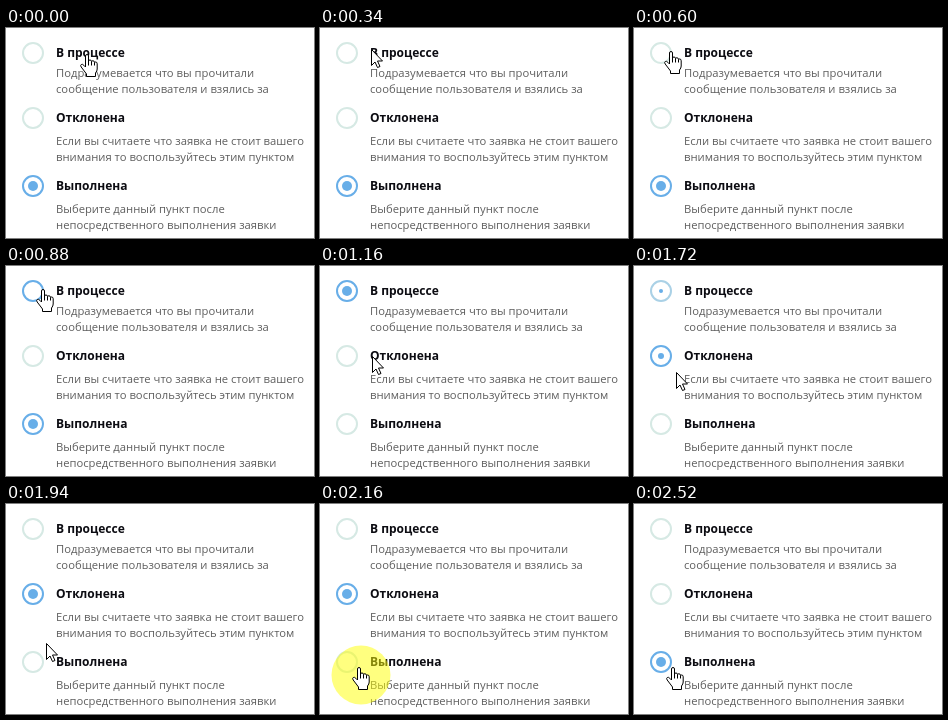
An HTML page that plays this animation: 308x210 px, repeating every 2.76 s.

```html
<!DOCTYPE html>
<html lang="ru">
<head>
<meta charset="utf-8">
<title>Статус заявки</title>
<style>
html, body { margin: 0; width: 100%; height: 100%; overflow: hidden; background: #fff; }
svg { display: block; width: 308px; height: 210px; }
text { font: 11.25px "Open Sans", sans-serif; fill: #5e5e5e; white-space: pre; }
.title { font-size: 12px; font-weight: 700; fill: #0c0c12; }
.ring { fill: none; stroke-width: 2; }
.dot { fill: #68aee8; }
.press { fill: #ff0; opacity: .5; }
.cursor path { fill: #fff; stroke: #000; stroke-linejoin: round; }
.cursor .line { fill: none; }
</style>
</head>
<body>
<svg viewBox="0 0 308 210">
  <g id="options"></g>
  <circle id="press" class="press" r="29.5"/>
  <g id="hand" class="cursor">
    <path d="M-1.5 13V2Q-1.5 .5 0 .5T1.5 2V7Q1.5 6 3 6T4.5 7.5Q4.5 6.8 6 6.8T7.5 8.5Q7.5 8 8.8 8T10.2 9.8V15Q10.2 17 8.5 19V22.5H-.5V20L-5.8 13Q-7 11.2 -5.7 10.5T-3.2 11.3Z"/>
    <path class="line" d="M1.5 6.5V11.5M4.5 7.5V11.5M7.5 8.5V11.5"/>
  </g>
  <g id="arrow" class="cursor">
    <path d="M.5 .5V16.5L4 13L6.5 18.5L9 17.5L6.5 12H11.5Z"/>
  </g>
</svg>
<script>
const LOOP = 2760, FIRST = 780, PERIOD = 690, HOLD = 100, FADE = 250;
const OFF = [214, 233, 228], ON = [104, 174, 232];

const options = [
  { y: 25, gap: 24, title: 'В процессе',
    lines: ['Подразумевается что вы прочитали', 'сообщение пользователя и взялись за'] },
  { y: 90, gap: 27, title: 'Отклонена',
    lines: ['Если вы считаете что заявка не стоит вашего', 'внимания то воспользуйтесь этим пунктом'] },
  { y: 158, gap: 27, title: 'Выполнена',
    lines: ['Выберите данный пункт после', 'непосредственного выполнения заявки'] }
];

// Key points of the pointer: time, x, y
const path = [
  [220, 81, 26], [340, 51, 21], [460, 37, 23], [900, 37, 23], [1160, 52, 90],
  [1400, 38, 92], [1600, 38, 92], [1720, 42, 106], [2100, 39, 163]
];

const $ = id => document.getElementById(id);
const clamp = v => Math.max(0, Math.min(1, v));
const mix = (a, b, k) => a + (b - a) * k;

function add(tag, attrs, text = '') {
  const el = document.createElementNS('http://www.w3.org/2000/svg', tag);
  for (const key in attrs) el.setAttribute(key, attrs[key]);
  el.textContent = text;
  return $('options').appendChild(el);
}

for (const o of options) {
  o.ring = add('circle', { class: 'ring', cx: 27, cy: o.y, r: 10 });
  o.dot = add('circle', { class: 'dot', cx: 27, cy: o.y });
  add('text', { class: 'title', x: 50, y: o.y + 4 }, o.title);
  o.lines.forEach((s, i) => add('text', { x: 50, y: o.y + o.gap + 16 * i }, s));
}

function pointer(t) {
  const i = Math.max(1, path.findLastIndex(p => p[0] <= t) + 1);
  const from = path[i - 1], to = path[i] || from;
  const k = clamp((t - from[0]) / (to[0] - from[0] || 1));
  return [1, 2].map(n => Math.round(mix(from[n], to[n], k)));
}

function place(id, x, y, visible) {
  $(id).setAttribute('transform', `translate(${x} ${y})`);
  $(id).style.display = visible ? '' : 'none';
}

function draw(t) {
  // Each option in turn is picked when the button is released
  const released = t - FIRST - HOLD;
  const step = Math.min(2, Math.floor(released / PERIOD));
  const now = step < 0 ? 2 : step;
  const before = (now + 2) % 3;
  const k = step < 0 ? 1 : clamp((released - step * PERIOD) / FADE);

  options.forEach((o, i) => {
    const size = i === now ? k : i === before ? 1 - k : 0;
    const tint = i === now ? 1 : size;
    o.dot.setAttribute('r', 5 * size);
    o.ring.setAttribute('stroke', `rgb(${OFF.map((c, n) => Math.round(mix(c, ON[n], tint)))})`);
  });

  const [x, y] = pointer(t);
  const hand = options.some(o => Math.abs(y - o.y) < 12 && (x < 42 || x > 53));
  const pressed = t >= FIRST && (t - FIRST) % PERIOD < HOLD;
  place('hand', x, y, hand);
  place('arrow', x, y, !hand);
  place('press', x + 2, y + 8, pressed);
}

const start = performance.now();
function tick() {
  const t = (performance.now() - start) % LOOP;
  draw(Math.floor(t / 20) * 20);
  requestAnimationFrame(tick);
}
tick();
</script>
</body>
</html>
```
